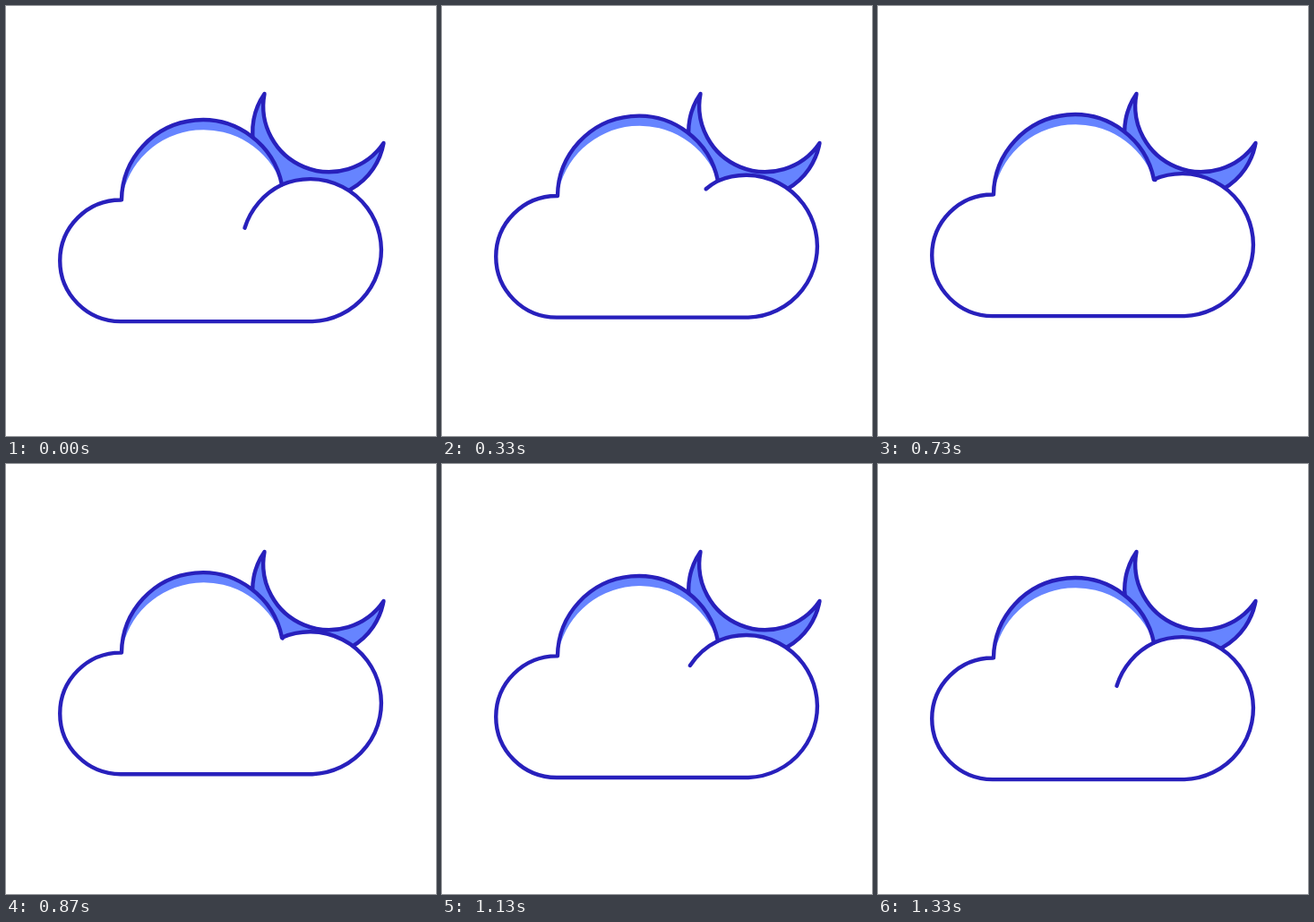
These frames come from a looping animation (480 by 480 pixels, 1370 ms). An HTML page:

```html
<!DOCTYPE html>
<html lang="en">
<head>
<meta charset="utf-8">
<title>Cloud and moon</title>
<style>
  html, body { margin: 0; height: 100%; overflow: hidden; background: #fff; }
  svg { display: block; width: 100vw; height: 100vh; }
  .line { fill: none; stroke: #2820bc; stroke-width: 4.4; stroke-linecap: round; stroke-linejoin: round; }
  .blue { fill: #6684ff; }
  .white { fill: #fff; }
</style>
</head>
<body>
<svg viewBox="0 0 480 480">
  <path class="line blue" d="M288.5 98A73.7 73.7 0 1 0 421.5 153A73.5 73.5 0 0 1 288.5 98Z"/>
  <g id="cloud">
    <path class="outline white"/>
    <path class="blue" d="M129 216.4A90.4 90.4 0 0 1 308 199.6A92.8 92.8 0 0 0 129 216.4Z"/>
    <path class="outline line"/>
    <path id="curl" class="line"/>
  </g>
</svg>
<script>
const LOOP = 1370, FPS = 30, MOVE = 15, LAST = 40;
const CX = 342, CY = 272.6, R = 79.5;
const cloud = document.getElementById('cloud');
const curl = document.getElementById('curl');

const outline = `M${CX} ${CY + R}H128A67.8 67.8 0 0 1 128 216.5L129 216.4`
  + `A90.4 90.4 0 0 1 308 199.6A${R} ${R} 0 1 1 ${CX} ${CY + R}Z`;
for (const path of document.querySelectorAll('.outline')) path.setAttribute('d', outline);

const ease = x => x * x * (3 - 2 * x);

function draw(now) {
  const step = Math.floor((now % LOOP + 3.4) * FPS / 1000);
  // rise, rest at the top, then fall back the same way
  const lift = ease(Math.max(0, Math.min(1, step / MOVE, (LAST - step) / MOVE)));
  const angle = (18.2 + 47.6 * lift) * Math.PI / 180;
  const x = CX - R * Math.cos(angle), y = CY - R * Math.sin(angle);
  cloud.setAttribute('transform', `translate(0 ${-6 * lift})`);
  curl.setAttribute('d', `M308 199.6A${R} ${R} 0 0 0 ${x} ${y}`);
}

const start = performance.now();
function tick() {
  draw(performance.now() - start);
  requestAnimationFrame(tick);
}
tick();
</script>
</body>
</html>
```
